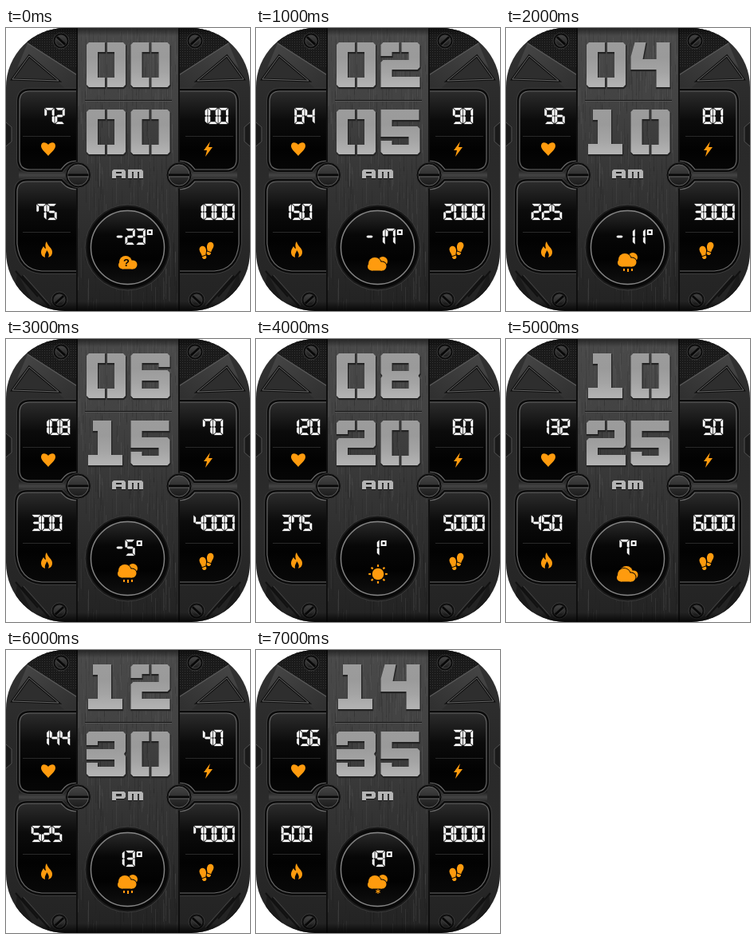
Animation, 306 px wide and 354 px high, one loop 8000 ms. Source, as an HTML page with a canvas:

```html
<!DOCTYPE html>
<html lang="en">
<head>
<meta charset="utf-8">
<title>Watch face</title>
<style>
html, body { margin: 0; width: 100%; height: 100%; overflow: hidden; background: #fff; }
canvas { display: block; width: 306px; height: 354px; }
</style>
</head>
<body>
<canvas id="face" width="306" height="354"></canvas>
<script>
const W = 306, H = 354, ORANGE = '#ff9b0e', PITCH = 13.1;
const screen = document.getElementById('face').getContext('2d');
const backdrop = document.createElement('canvas');
backdrop.width = W;
backdrop.height = H;
let c = backdrop.getContext('2d');

// Stencil numerals on a 49 x 56 grid
const BIG = {
  0: 'M3 0H23V12H14V44H23V56H3L0 53V3ZM26 0H46L49 3V53L46 56H26V44H35V12H26Z',
  1: 'M8 0H31V43H45V56H2V43H14V13H8Z',
  2: 'M3 0H23V12H14V17H0V3ZM26 0H46L49 3V31L46 34H14V43H49V56H0V25L3 22H35V12H26Z',
  3: 'M3 0H46L49 3V25L47 28L49 31V53L46 56H3L0 53V39H14V44H35V35H0V22H35V12H14V17H0V3Z',
  4: 'M5 0H19L15 21H32V0H49V56H32V34H0V18Z',
  5: 'M0 0H48V13H14V21H46L49 24V53L46 56H3L0 53V39H14V44H35V34H0Z',
  6: 'M3 0H46L49 3V17H35V12H14V21H46L49 24V53L46 56H3L0 53V3ZM14 34V44H35V34Z',
  8: 'M3 0H46L49 3V25L47 28L49 31V53L46 56H3L0 53V31L2 28L0 25V3ZM14 12V22H35V12ZM14 34V44H35V34Z'
};
const LETTERS = {
  A: 'M2 0H15L17 2V11H12V8H5V11H0V2ZM5 3V5H12V3Z',
  P: 'M0 0H15L17 2V7L15 9H5V11H0ZM5 3V6H12V3Z',
  M: 'M0 0H17L19 2V11H14V3H12V11H7V3H5V11H0Z'
};
// Seven segments a-g on a 12 x 20 cell
const SEGMENTS = {
  a: 'M1 0H11L8.8 2.6H3.2Z', b: 'M12 .8V9.2L10.6 9.8L9.4 8.6V3.2Z',
  c: 'M12 10.8V19.2L9.4 16.8V11.4L10.6 10.2Z', d: 'M1 20H11L8.8 17.4H3.2Z',
  e: 'M0 10.8V19.2L2.6 16.8V11.4L1.4 10.2Z', f: 'M0 .8V9.2L1.4 9.8L2.6 8.6V3.2Z',
  g: 'M2 10L3.3 8.7H8.7L10 10L8.7 11.3H3.3Z'
};
const LIT = { 0: 'abcdef', 1: 'bc', 2: 'abged', 3: 'abgcd', 4: 'fgbc', 5: 'afgcd',
  6: 'afgedc', 7: 'fabc', 8: 'abcdefg', 9: 'abcdfg', '-': 'g' };

function shape(d, fill, x = 0, y = 0, stroke, width = 1) {
  const path = new Path2D(d);
  c.save();
  c.translate(x, y);
  if (fill) { c.fillStyle = fill; c.fill(path, 'evenodd'); }
  if (stroke) { c.strokeStyle = stroke; c.lineWidth = width; c.stroke(path); }
  c.restore();
}

function disc(x, y, r, fill, stroke, width = 1) {
  c.beginPath();
  c.arc(x, y, r, 0, 7);
  if (fill) { c.fillStyle = fill; c.fill(); }
  if (stroke) { c.strokeStyle = stroke; c.lineWidth = width; c.stroke(); }
}

function block(x, y, w, h, fill) {
  c.fillStyle = fill;
  c.fillRect(x, y, w, h);
}

function ramp(x0, y0, x1, y1, ...colors) {
  const g = c.createLinearGradient(x0, y0, x1, y1);
  colors.forEach((color, i) => g.addColorStop(i / (colors.length - 1), color));
  return g;
}

function screw(x, y, r, angle, rim) {
  disc(x, y, r + 3, '#0d0d0d', '#383838');
  disc(x, y, r, ramp(0, y - r, 0, y + r, '#444', '#1b1b1b'), rim);
  c.save();
  c.translate(x, y);
  c.rotate(angle);
  block(-r, -1.5, 2 * r, 3, '#080808');
  block(-r, 1.5, 2 * r, 1, rim);
  c.restore();
}

function side() {
  block(0, 0, 92, H, ramp(0, 0, 0, H, '#333', '#292929', '#2b2b2b', '#222'));
  // Meshed corners with a smooth diagonal brace
  shape('M27 0H92V60L27 19Z M8 354L14 306L40 354Z', '#1a1a1a');
  for (let i = 0; i < 320; i++) {
    block(30 + i * 3 % 60, 2 + Math.floor(i / 20) * 3, 1, 1, '#343434');
  }
  shape('M27 19L91 60V79H78L29 35L14 50Z', ramp(30, 20, 80, 79, '#444', '#303030'));
  shape('M27 19L91 60', null, 0, 0, '#5a5a5a', 1.3);
  shape('M8 64L29 35L66 66Z', '#2e2e2e', 0, 0, '#111', 3);
  shape('M8 64L29 35L66 66Z', null, 0, 0, '#666');
  shape('M20 310L54 348M12 304L40 336', null, 0, 0, '#111', 2);
  shape('M22 309L56 347', null, 0, 0, '#444');
  shape('M0 118L7 124V142L0 148', '#1a1a1a', 0, 0, '#505050');
  screw(69, 16, 7, .75, '#454545');
  screw(67, 340, 7, -.75, '#3a3a3a');
  block(16, 170, 76, 28, ramp(0, 176, 0, 192, '#191919', '#444', '#1b1b1b'));
  for (const [d, top, rule] of [
    ['M30 79H89V166C76 167 74 171 69 177H30Q17 177 17 164V92Q17 79 30 79Z', 79, 135],
    ['M27 192H69C74 197 76 201 89 202V304H45Q17 302 14 270V205Q14 192 27 192Z', 192, 255]
  ]) {
    shape(d, null, 0, 0, '#3c3c3c', 8);
    shape(d, null, 0, 0, '#0b0b0b', 6);
    shape(d, ramp(0, top, 0, top + 110, '#2c2c2c', '#0b0b0b', '#020202', '#080808'), 0, 0, '#686868', 1.2);
    block(21, rule, 60, 1, '#292929');
  }
}

function paintBackdrop() {
  c.beginPath();
  c.roundRect(0, 0, W, H, 74);
  c.clip();
  side();
  c.save();
  c.translate(W, 0);
  c.scale(-1, 1);
  side();
  c.restore();

  // Brushed centre plate
  block(88, 0, 130, H, '#0f0f0f');
  block(90, 0, 126, H, ramp(0, 0, 0, H, '#4a4a4a', '#434343', '#373737', '#2c2c2c', '#222'));
  let seed = 7;
  const random = () => (seed = seed * 16807 % 2147483647) / 2147483647;
  for (let i = 0; i < 480; i++) {
    const tone = random() < .6 ? '0,0,0' : '150,150,150';
    block(90 + Math.floor(random() * 125), random() ** 1.4 * H, 1, 8 + random() * 34,
      `rgba(${tone},${.03 + random() * .1})`);
  }
  block(0, 0, W, 10, ramp(0, 0, 0, 10, 'rgba(0,0,0,.5)', 'transparent'));
  block(0, 342, W, 12, ramp(0, 342, 0, H, 'transparent', 'rgba(0,0,0,.8)'));
  block(99, 90, 109, 1, '#161616');
  block(99, 91, 109, 1, '#555');
  screw(90.5, 184, 13, 0, '#606060');
  screw(217, 184, 13, 0, '#606060');

  disc(152.5, 274.5, 53.5, '#191919', '#3c3c3c');
  disc(152.5, 274.5, 49, null, '#090909', 4);
  disc(152.5, 274.5, 46, ramp(0, 228, 0, 320, '#2a2a2a', '#070707', '#020202', '#101010'), '#858585', 1.4);

  shape('M0 16C-3 12-9 8-9 3.5C-9-2-3-2 0 2C3-2 9-2 9 3.5C9 8 3 12 0 16Z', ORANGE, 53, 144);
  shape('M3 0L-5 11H-1L-3 19L6 7H1Z', ORANGE, 253, 142);
  shape('M0 0C1 6 7 8 7 13C7 17 5 19 2 20C4 16 2 14 0 11C0 14-3 15-2 20C-5 19-7 17-7 13C-7 10-5 8-4 6C-3 8-2 9-1 9C-2 6-2 2 0 0Z', ORANGE, 51, 267);
  const foot = 'M-4-3C-4-8 3-9 4-4C5 0 3 2 3 4L-2 5C-2 2-4 0-4-3ZM-2 6L3 5C5 10-2 11-2 6Z';
  for (const [x, y, flip] of [[247, 280, 1], [256, 275, -1]]) {
    c.save();
    c.translate(x, y);
    c.scale(flip, 1);
    c.rotate(-.15);
    shape(foot, ORANGE);
    c.restore();
  }
}

function bigNumber(value, y) {
  String(value).padStart(2, '0').split('').forEach((digit, i) => {
    const x = 101 + i * 55.5;
    shape(BIG[digit], '#222', x + .5, y + 1.5, '#242424', 1.5);
    shape(BIG[digit], ramp(0, 0, 0, 56, '#9c9c9c', '#9a9a9a', '#a4a4a4', '#b4b4b4'), x, y);
  });
}

function segmentText(text, x, y) {
  for (const char of text) {
    if (char === '°') {
      shape('M1 0H7V7H0V1Z M2 2V5H5V2Z', '#fff', x + 1, y + 1);
    } else {
      for (const name of LIT[char]) shape(SEGMENTS[name], '#fff', x, y, '#fff', .3);
    }
    x += PITCH;
  }
}

function centered(value, x, y) {
  const text = String(value);
  segmentText(text, x - (text.length * PITCH - 1.1) / 2, y);
}

function cloud(x, y, gap = 0) {
  for (const [grow, fill] of [[gap, '#080808'], [0, ORANGE]]) {
    disc(x - 3, y - 1, 8 + grow, fill);
    disc(x + 6, y + 2, 5.5 + grow, fill);
    disc(x - 7, y + 2.5, 5 + grow, fill);
    block(x - 7, y, 13, 7.5 + grow, fill);
  }
}

function weather(k) {
  if (k === 4) {
    disc(153, 294, 7.3, ORANGE);
    for (let i = 0; i < 8; i++) {
      const a = i * Math.PI / 4, cos = Math.cos(a), sin = Math.sin(a);
      shape(`M${9 * cos} ${9 * sin}L${11.8 * cos} ${11.8 * sin}`, null, 153, 294, ORANGE, 2.2);
    }
  } else if (k === 0) {
    cloud(153, 294);
    c.fillStyle = '#050505';
    c.font = 'bold 13px "Liberation Sans", Arial, sans-serif';
    c.textAlign = 'center';
    c.fillText('?', 151, 298);
  } else if (k === 5) {
    cloud(154, 293);
    cloud(151, 296, 1);
  } else {
    const y = k === 1 ? 296 : 291;
    disc(159, y - 4, 6, ORANGE);
    cloud(152, y, 1);
    if (k === 7) {
      for (let i = 0; i < 3; i++) {
        const a = Math.PI / 2 + i * Math.PI / 3, dx = 3 * Math.cos(a), dy = 3 * Math.sin(a);
        shape(`M${-dx} ${-dy}L${dx} ${dy}`, null, 153, 302, ORANGE, 1.1);
      }
    } else if (k > 1) {
      for (const x of [148, 153, 158]) block(x - 1, 301, 2, x === 153 ? 4 : 3, ORANGE);
    }
  }
}

function render(k) {
  c.clearRect(0, 0, W, H);
  c.drawImage(backdrop, 0, 0);
  bigNumber(2 * k, 18);
  bigNumber(5 * k, 102);
  const half = k < 6 ? 'A' : 'P';
  for (const [y, fill] of [[178, '#151515'], [177, '#b5b5b5']]) {
    shape(LETTERS[half], fill, 133, y);
    shape(LETTERS.M, fill, 153, y);
  }
  centered(72 + 12 * k, 61, 100);
  centered(100 - 10 * k, 259.5, 100);
  centered(75 * (k + 1), 51, 220);
  centered(1000 * (k + 1), 261, 220);
  const degrees = -23 + 6 * k;
  segmentText(degrees + '°', degrees < 0 || degrees > 9 ? 136.5 : 142.5, 251);
  weather(k);
}

paintBackdrop();
c = screen;
let shown = -1, start;
function tick(now) {
  start ??= now;
  const k = Math.floor((now - start) / 1000) % 8;
  if (k !== shown) render(shown = k);
  requestAnimationFrame(tick);
}
requestAnimationFrame(tick);
</script>
</body>
</html>
```
